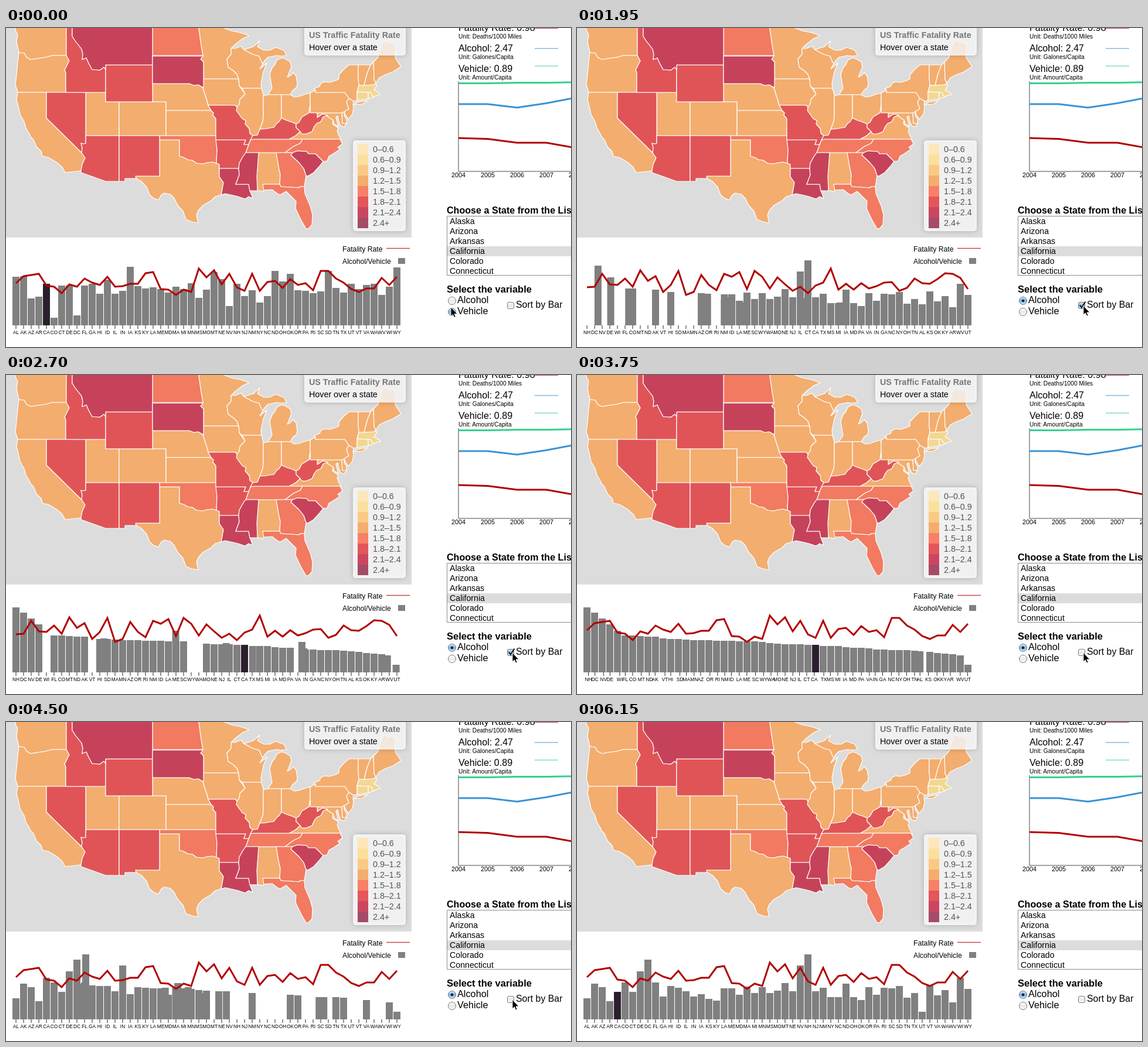
Animation, 964 px wide and 545 px high, one loop 6.52 s. Source, as an HTML page:

```html
<!DOCTYPE html>
<html lang="en">
<head>
<meta charset="utf-8">
<title>US Traffic Fatality Rate</title>
<style>
html, body { margin: 0; width: 100%; height: 100%; overflow: hidden; background: #fff; }
svg { display: block; font-family: "Liberation Sans", Arial, sans-serif; }
.map path { stroke: #fff; stroke-width: 1.2; stroke-linejoin: round; }
.panel { fill: #fff; fill-opacity: .8; filter: drop-shadow(0 0 4px rgba(0, 0, 0, .25)); }
.head { font-weight: bold; font-size: 16.1px; }
.big { font-size: 16.1px; }
.unit { font-size: 10.2px; }
.year { font-size: 10.8px; text-anchor: middle; }
.list { font-size: 14.2px; }
.key { font-size: 12.2px; }
.tick text { font-size: 8.3px; text-anchor: middle; }
.thick { fill: none; stroke-width: 3; }
</style>
</head>
<body>
<svg width="964" height="545" viewBox="0 0 964 545">
<defs>
  <linearGradient id="plain" x2="0" y2="1"><stop stop-color="#fff"/><stop offset=".5" stop-color="#e9e9e9"/><stop offset="1" stop-color="#fcfcfc"/></linearGradient>
  <linearGradient id="blue" x2="0" y2="1"><stop stop-color="#d9ebfa"/><stop offset=".5" stop-color="#7fb6e6"/><stop offset="1" stop-color="#c4ecff"/></linearGradient>
  <linearGradient id="down" x2="0" y2="1"><stop stop-color="#b4b4b4"/><stop offset="1" stop-color="#d2d2d2"/></linearGradient>
</defs>

<rect width="692" height="358" fill="#dcdcdc"/>
<g class="map">
  <g fill="#f3ad6e">
    <path d="M14-5L17 6 20 10 18 24 22 42 31 43 35 50 42 54 54 52 68 50 79 47 103 47V-5z"/>
    <path d="M22 42L20 58 18 80 16 97 20 110H102V76L100 72 104 64 108 56 103 47H79L68 50 54 52 42 54 35 50 31 43z"/>
    <path d="M20 110L18 122 21 134 24 148 31 160 34 171 40 181 42 186 47 191 52 203 60 211 62 219 72 221 79 225 87 230 96 238 101 247 128 244 130 233 135 222 129 213 69 154V110z"/>
    <path d="M136 110H170V126H193V184H136z"/>
    <path d="M193 126H273V184H193z"/>
    <path d="M250 95H313L320 98 328 97 336 102 339 112 343 124 345 132 350 141H273V126H250z"/>
    <path d="M273 141H350L354 145 353 149 358 155V184H273z"/>
    <path d="M262 191H296V219L303 221 310 225 318 226 325 231 336 232 343 230 352 229 359 231 364 233V254L371 264 368 281 367 285 357 288 350 295 336 303 328 312 325 320 328 333 317 331 307 327 302 313 293 303 287 291 280 284 270 282 265 285 260 294 252 291 245 285 240 272 231 262 222 257 221 253H262z"/>
    <path d="M328-5L333 30 336 47 332 53 337 58V87H397L394 79 388 73 379 67 377 53 384 45V35L391 28 404 18 415 13 400 8 385 5 372 0 350-5z"/>
    <path d="M337 87H397L398 99 408 113 399 122 398 130 394 135 391 132H345L343 124 339 112 336 102z"/>
    <path d="M384 35L391 35 401 31 406 37 421 45 432 48 436 58 438 61 433 70 445 60 439 75 435 95 436 103H403L398 99 397 87 394 79 388 73 379 67 377 53 384 45z"/>
    <path d="M406 37L422 32 433 22 429 32 440 38 450 38 460 33 474 38 479 47 470 48 461 47 447 50 441 56 438 61 436 58 432 48 421 45z"/>
    <path d="M447 114L454 103 452 92 450 79 454 68 459 62 462 55 470 51 477 53 485 58 487 66 480 84 486 81 490 76 495 82 497 95 496 101 489 107 485 114z"/>
    <path d="M403 103H436L439 114V151L438 160 433 173 429 183 421 184 416 180 415 172 408 164 409 158 403 155 393 141 394 135 398 130 399 122 408 113z"/>
    <path d="M439 116L447 114H470V154L466 160 462 163 457 170 449 171 445 172 433 173 438 160 439 151z"/>
    <path d="M470 114H485L492 118 500 117 508 114 519 111V131L517 145 505 152 500 161 495 164 488 161 479 158 470 154z"/>
    <path d="M431 213H461L466 242 468 250 467 267H438L441 275 438 280 434 278 429 278 428 254z"/>
    <path d="M483 190L494 184 502 177 505 181 512 181 522 177 526 168 530 163 537 160 541 152 547 149 550 152 558 157 557 164 567 171 565 176 568 184 572 190z"/>
    <path d="M531 145H573L574 163H581L577 169 571 167 568 160 566 150 563 152 565 160 567 168 560 164 558 157 550 152 547 149 540 147 531 153z"/>
    <path d="M573 145L577 143 577 150 581 156V163H574z"/>
    <path d="M519 111L528 106V110H578L585 120 581 127 585 138 577 143 573 145H519z"/>
    <path d="M585 120L593 125 592 131 593 137 591 147 584 156 579 148 577 143 585 138 581 127z"/>
    <path d="M528 106L525 104 535 100 537 95 543 92 552 93 562 90 568 87 568 80 576 71 585 63H601V85L602 98 599 109V124L593 125 585 120 578 110H528z"/>
    <path d="M594 131L600 127 617 124 608 130z"/>
    <path d="M601 63H622L616 78 611 98H602L601 85z"/>
    <path d="M622 63L627 58 628 88 631 94 628 97 611 98 616 78z"/>
    <path d="M627 58L635 50 636 43 639 35 643 24 648 22 652 26 659 24 664 29V51L674 66 660 75 649 79 637 85 631 94 628 88z"/>
  </g>
  <g fill="#f27a60">
    <path d="M250-5H328L333 30 336 47H250z"/>
    <path d="M262 184H358L360 207 359 231 352 229 343 230 336 232 325 231 318 226 310 225 303 221 296 219V191H262z"/>
    <path d="M417 191L423 190H506L502 197 491 202 476 213H409L414 199z"/>
    <path d="M506 190H570L574 198 566 204 570 207 558 215 551 219 548 227 541 228 528 215 516 215 513 211 497 210 489 213H476L491 202 502 197z"/>
    <path d="M461 213H489L486 217 500 230 508 240 512 252 509 271 502 271 500 273 469 271 467 267 468 250 466 242z"/>
    <path d="M438 267H467L469 271 500 273 502 271 509 271 510 283 519 304 523 319 522 336 517 342 512 343 504 329 500 321 494 308 495 296 485 286 478 279 468 285 463 283 454 276 440 277z"/>
  </g>
  <g fill="#e05457">
    <path d="M69 110H136V197L132 198 128 197 130 205 129 213 69 154z"/>
    <path d="M103-5H113V14L118 22 122 27 129 36 131 45 130 54 137 51 141 60 147 71 160 72 167 67 170 71V110H102V76L100 72 104 64 108 56 103 47z"/>
    <path d="M170 63H250V126H170z"/>
    <path d="M136 184H193V262H170L128 247V244L130 233 135 222 129 213 130 205 128 197 132 198 136 197z"/>
    <path d="M193 184H262V253H221L222 257H203V262H193z"/>
    <path d="M358 191H409L406 199H414L409 213 404 220 398 231 397 240H364V233L359 231 360 207z"/>
    <path d="M345 132H391L394 135 393 141 403 155 409 158 408 164 415 172 416 180 421 184 417 191 414 199H406L409 191H358V155L353 149 354 145 350 141z"/>
    <path d="M421 184L429 183 433 173 445 172 449 171 457 170 462 163 466 160 470 154 479 158 488 161 495 164 495 170 502 177 494 184 483 190H423L417 191z"/>
    <path d="M502 177L495 170 495 164 500 161 505 152 517 145 519 131V145H531V153L540 147 549 149 541 152 537 160 530 163 526 168 522 177 512 181 505 181z"/>
  </g>
  <g fill="#c6425b">
    <path d="M113-5H250V63H170V71L167 67 160 72 147 71 141 60 137 51 130 54 131 45 129 36 122 27 118 22 113 14z"/>
    <path d="M250 48H336L332 53 337 58V102L328 97 320 98 313 95H250z"/>
    <path d="M364 240H397L398 251 392 267H414L416 278 418 283 421 291 414 288 408 292 396 288 388 286 374 283 367 285 368 281 371 264 364 254z"/>
    <path d="M409 213H431L428 254 429 278H416L414 267H392L398 251 397 240 398 231 404 220z"/>
    <path d="M486 217L489 213 497 210 513 211 516 215 528 215 541 228 534 237 525 247 515 253 512 252 508 240 500 230z"/>
  </g>
  <g fill="#f3d792">
    <path d="M602 98H611L628 97 631 95 633 98 628 106 632 108 637 111 639 114 632 115 627 118 622 110 599 109z"/>
    <path d="M599 109L618 110V121L599 124z"/>
    <path d="M618 110H622L627 118 618 121z"/>
  </g>
</g>

<rect class="panel" x="509" y="-12" width="173" height="59" rx="5"/>
<text x="517" y="17" font-size="14.3" font-weight="bold" fill="#777">US Traffic Fatality Rate</text>
<text x="517" y="38" font-size="14.3">Hover over a state</text>
<rect class="panel" x="592" y="192" width="90" height="155" rx="5"/>
<g id="legend" font-size="14.3" fill="#555"></g>

<text class="big" x="772" y="5">Fatality Rate: 0.98</text>
<text class="unit" x="772" y="18">Unit: Deaths/1000 Miles</text>
<text class="big" x="772" y="40">Alcohol: 2.47</text>
<text class="unit" x="772" y="53">Unit: Galones/Capita</text>
<text class="big" x="772" y="75">Vehicle: 0.89</text>
<text class="unit" x="772" y="88">Unit: Amount/Capita</text>
<g stroke-width="1.5">
  <path d="M902 .5H942" stroke="#cf6468"/>
  <path d="M902 35H942" stroke="#84b9e2"/>
  <path d="M902 65H942" stroke="#7fdfb3"/>
</g>
<path d="M772 91V245H964" fill="none" stroke="#444"/>
<path class="thick" d="M772 94.5L822 94.5 872 93.5 922 93.5 972 92.5" stroke="#33d08d"/>
<path class="thick" d="M772 130H822L872 136 922 128.500 972 119" stroke="#3a93d4"/>
<path class="thick" d="M772 188L822 189.500 872 196H922L972 205" stroke="#b20000"/>
<g id="years"></g>

<text class="head" x="752" y="317">Choose a State from the List</text>
<path d="M970 321.500H752.500V422.500H970" fill="none" stroke="#8c8c8c"/>
<rect x="753" y="373" width="211" height="17" fill="#dcdcdc"/>
<g id="list"></g>
<text class="head" x="752" y="452" style="font-size:16.500px">Select the variable</text>
<g id="radios" stroke="#777"></g>
<text x="770" y="470" font-size="16.3">Alcohol</text>
<text x="770" y="489" font-size="16.3">Vehicle</text>
<rect id="box" x="855.5" y="468.500" width="11" height="11" rx="2.5" stroke="#777"/>
<path id="check" d="M858 473.500L861 477.500 867.500 467.500" fill="none" stroke="#111" stroke-width="2"/>
<text x="870" y="478" font-size="15.9">Sort by Bar</text>

<text class="key" x="574" y="382">Fatality Rate</text>
<path d="M649 376.500H689" stroke="#c8474a" stroke-width="1.5"/>
<text class="key" x="574" y="403">Alcohol/Vehicle</text>
<rect x="669" y="393" width="12" height="10" fill="#808080"/>
<g id="bars"></g>
<g id="ticks"></g>
<path id="rate" class="thick" stroke="#b20000"/>
<path id="cursor" d="M0 0V15.500L3.500 12.300 5.800 17.500 8.200 16.400 6 11.400H11z" stroke="#fff" stroke-width=".9"/>
</svg>

<script>
const $ = id => document.getElementById(id);
function add(parent, tag, attrs, text) {
  const el = document.createElementNS('http://www.w3.org/2000/svg', tag);
  for (const k in attrs) el.setAttribute(k, attrs[k]);
  if (text) el.textContent = text;
  return parent.appendChild(el);
}

const states = 'AL AK AZ AR CA CO CT DE DC FL GA HI ID IL IN IA KS KY LA ME MD MA MI MN MS MO MT NE NV NH NJ NM NY NC ND OH OK OR PA RI SC SD TN TX UT VT VA WA WV WI WY'.split(' ');
const ranked = 'NH DC NV DE WI FL CO MT ND AK VT HI SD MA MN AZ OR RI NM ID LA ME SC WY WA MO NE NJ IL CT CA TX MS MI IA MD PA VA IN GA NC NY OH TN AL KS OK KY AR WV UT'.split(' ');
const rank = states.map(s => ranked.indexOf(s));

// Bar heights: alcohol in ranked order, vehicles by state
const alcohol = [111, 102, 92, 82, 71, 63, 63, 62, 61, 61, 58, 57, 57, 56, 55, 55, 55, 54, 54, 54, 53, 53, 53, 52, 50, 49, 48, 48, 48, 47, 47, 45, 45, 45, 43, 42, 42, 41, 39, 39, 38, 38, 38, 37, 36, 35, 33, 32, 31, 29, 13];
const vehicle = [83, 84, 46, 49, 71, 13, 68, 68, 17, 68, 71, 54, 78, 54, 59, 100, 67, 63, 65, 62, 56, 66, 62, 72, 47, 61, 91, 79, 33, 71, 50, 60, 39, 50, 93, 75, 88, 60, 59, 55, 58, 93, 64, 56, 71, 62, 69, 71, 52, 66, 99];
const fatality = [436, 424, 422, 420, 440, 442, 453, 438, 442, 428, 435, 439, 425, 442, 441, 437, 437, 419, 417, 446, 447, 456, 447, 451, 411, 426, 414, 438, 420, 443, 449, 420, 449, 434, 432, 444, 429, 439, 436, 448, 415, 415, 428, 435, 446, 451, 445, 445, 427, 439, 425];

const shades = ['#fde6b9', '#fbe09b', '#f9ca85', '#f4ad6d', '#f88068', '#e45659', '#cb4660', '#a54b68'];
['0–0.6', '0.6–0.9', '0.9–1.2', '1.2–1.5', '1.5–1.8', '1.8–2.1', '2.1–2.4', '2.4+'].forEach((label, i) => {
  add($('legend'), 'rect', { x: 600, y: 198 + 18 * i, width: 18, height: 18, fill: shades[i] });
  add($('legend'), 'text', { x: 626, y: 212 + 18 * i }, label);
});
for (let i = 0; i < 5; i++) add($('years'), 'text', { class: 'year', x: 772 + 50 * i, y: 255 }, String(2004 + i));
['Alaska', 'Arizona', 'Arkansas', 'California', 'Colorado', 'Connecticut'].forEach((name, i) =>
  add($('list'), 'text', { class: 'list', x: 757, y: 335 + 17 * i }, name));

const radios = [466, 485].map(cy => ({
  ring: add($('radios'), 'circle', { cx: 761, cy, r: 6.5 }),
  dot: add($('radios'), 'circle', { cx: 761, cy, r: 2.4, fill: '#16233c', stroke: 'none' })
}));
const bars = states.map(s => add($('bars'), 'rect', { width: 12, fill: s === 'CA' ? '#2b1f2e' : '#808080' }));
const ticks = states.map(s => {
  const g = add($('ticks'), 'g', { class: 'tick' });
  add(g, 'path', { d: 'M0 0V6', stroke: '#222' });
  add(g, 'text', { y: 15 }, s);
  return g;
});

const STEP = 150, LOOP = 6520, PICK = 600, SORT = 1650, UNSORT = 3750;
const MOVE = 345, STAGGER = 20;
const path = [[0, 759, 477], [150, 759, 467], [900, 786, 471], [1050, 838, 475], [1200, 864, 474.5],
  [5700, 868, 482], [5850, 889, 507], [6000, 915, 529], [6150, 915, 570]];

function ease(p) {
  p = Math.min(1, Math.max(0, p));
  return p < .5 ? 4 * p ** 3 : 1 - 4 * (1 - p) ** 3;
}

// Slot of a state while the order changes back and forth
function slot(i, t, delay) {
  if (t < SORT) return i;
  const back = t >= UNSORT;
  const spent = back ? Math.max(41, t - 3772) : t - 1532;
  const p = ease((spent - delay) / MOVE);
  return i + (rank[i] - i) * (back ? 1 - p : p);
}

function draw(t) {
  const picked = t >= PICK, sorted = t >= SORT && t < UNSORT;
  const pressed = (t >= 1500 && t < SORT) || (t >= 3600 && t < UNSORT);
  states.forEach((s, i) => {
    const h = picked ? alcohol[rank[i]] : vehicle[i];
    const bar = bars[i];
    bar.setAttribute('x', 11 + 13 * slot(i, t, i * STAGGER));
    bar.setAttribute('y', 508 - h);
    bar.setAttribute('height', h);
    ticks[i].setAttribute('transform', `translate(${17 + 13 * slot(i, t, 0)} 508)`);
  });
  const order = sorted ? ranked : states;
  $('rate').setAttribute('d', 'M' + order.map((s, k) => `${17 + 13 * k} ${fatality[states.indexOf(s)]}`).join('L'));

  radios.forEach(({ ring, dot }, k) => {
    const on = (k === 0) === picked;
    ring.setAttribute('fill', on ? 'url(#blue)' : 'url(#plain)');
    dot.setAttribute('visibility', on ? 'visible' : 'hidden');
  });
  $('box').setAttribute('fill', `url(#${pressed ? 'down' : sorted ? 'blue' : 'plain'})`);
  $('check').setAttribute('visibility', sorted ? 'visible' : 'hidden');

  const [, x, y] = path.filter(p => p[0] <= t).pop();
  $('cursor').setAttribute('transform', `translate(${x} ${y})`);
}

const start = performance.now();
function frame() {
  const t = (performance.now() - start) % LOOP;
  draw(Math.min(6150, Math.floor(t / STEP) * STEP));
  requestAnimationFrame(frame);
}
frame();
</script>
</body>
</html>
```
